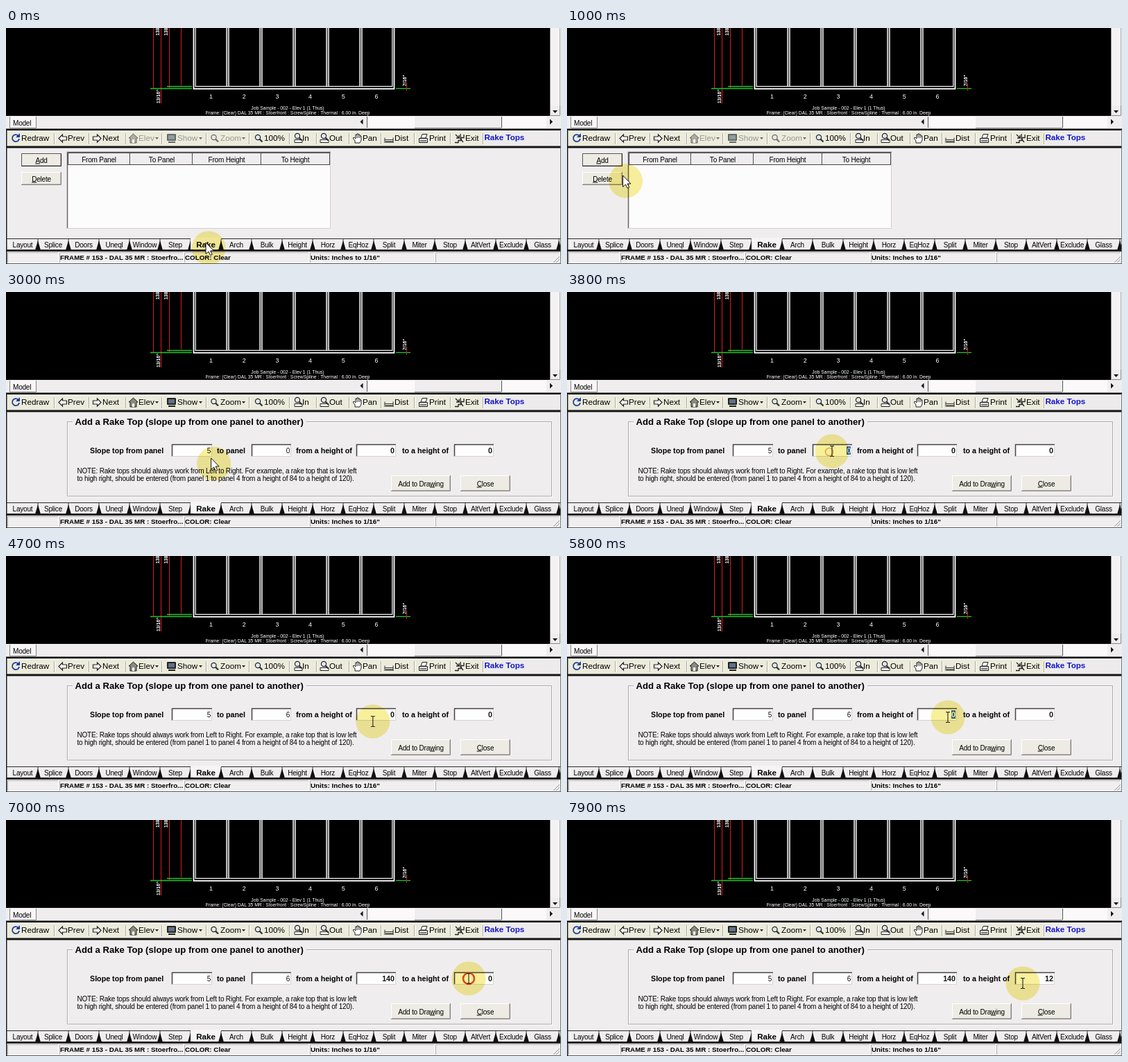
These frames come from a looping animation (800 px wide and 341 px high, 8 s). An HTML page:

```html
<!DOCTYPE html>
<html lang="en">
<head>
<meta charset="utf-8">
<title>Rake Tops</title>
<style>
html, body { margin: 0; width: 100%; height: 100%; overflow: hidden; background: #efedee; }
svg { display: block; width: 100vw; height: 100vh; }
text { font: 10px "Liberation Sans", Arial, sans-serif; letter-spacing: -.2px; white-space: pre; }
.bold { font-weight: bold; font-size: 10.7px; letter-spacing: 0; }
.bar { font-size: 11.7px; letter-spacing: 0; }
.title { font-weight: bold; font-size: 13.1px; letter-spacing: 0; }
.head { font-weight: bold; font-size: 11.6px; letter-spacing: 0; }
.status { font-weight: bold; font-size: 9.8px; letter-spacing: 0; }
.cad { font-size: 6.8px; letter-spacing: 0; fill: #fff; }
.size { font-size: 6.8px; font-weight: bold; letter-spacing: 0; fill: #fff; }
.num { font-size: 9px; letter-spacing: 0; fill: #fff; }
.u { text-decoration: underline; }
.off { opacity: .65; }
.off text { opacity: .55; }
#spot { mix-blend-mode: multiply; }
</style>
</head>
<body>
<svg id="stage" viewBox="0 0 800 341" xmlns="http://www.w3.org/2000/svg"></svg>
<script>
const FACE = '#efedee', BAR = '#ecebdc';

const rect = (x, y, w, h, fill, extra = '') =>
  `<rect x="${x}" y="${y}" width="${w}" height="${h}" fill="${fill}" ${extra}/>`;
const path = (d, stroke = '#111', width = 1, fill = 'none') =>
  `<path d="${d}" stroke="${stroke}" stroke-width="${width}" fill="${fill}"/>`;
const text = (x, y, str, cls = '', anchor = 'start', extra = '') =>
  `<text x="${x}" y="${y}" class="${cls}" text-anchor="${anchor}" ${extra}>${str}</text>`;
const key = c => `<tspan class="u">${c}</tspan>`;
const turned = (x, y, str) => text(0, 0, str, 'size', 'start', `transform="translate(${x} ${y}) rotate(-90)"`);

function button(x, y, w, h, label, strong) {
  const edge = strong ? '#222' : '#858383';
  return rect(x, y, w, h, '#fff') +
    rect(x + 1, y + 1, w - 2, h - 2, '#bdb9b4') +
    rect(x + 1, y + 1, w - 3, h - 3, '#edebe3') +
    path(`M${x} ${y + h - .5}H${x + w - .5}V${y}`, edge) +
    (strong ? path(`M${x + .5} ${y + h}V${y + .5}H${x + w}`, '#555') : '') +
    text(x + w / 2, y + h / 2 + 4, label, '', 'middle');
}

function drawing() {
  let s = rect(0, 0, 784, 127, '#000');
  for (const [x, y] of [[212.5, 87], [223.5, 109], [235.5, 87], [252.5, 83]]) s += path(`M${x} 0V${y}`, '#d01c1c', 1.1);
  s += path('M208 87.5H268M232 84.5H268', '#22c52c', 1.4);
  s += path('M562 87.5H583', '#22c52c', 1.3) + path('M577.5 80V91', '#d01c1c');
  s += path('M270.5 0V87.8H559.5V0', '#fff', 1.8) + path('M273.2 0V84.3H556.8V0', '#eee', 1.3);
  for (let i = 0; i < 5; i++) {
    const x = 318 + 48 * i;
    s += rect(x - .5, 0, 4, 84, '#444') + path(`M${x} 0V84M${x + 3} 0V84`, '#f2f2f2', 1.4);
  }
  for (let i = 0; i < 6; i++) s += text(295.5 + 47.7 * i, 102, i + 1, 'num', 'middle');
  s += turned(221, 11, '138') + turned(233, 11, '138') + turned(221.5, 109, '13/16"') + turned(577, 84, '7/16"');
  s += text(406, 117.5, 'Job Sample - 002 - Elev 1 (1 Thus)', 'cad', 'middle');
  s += text(406, 124.5, 'Frame: (Clear) DAL 35 MR : Stoerfront : ScrewSpline : Thermal : 6.00 in. Deep', 'cad', 'middle');
  return s;
}

function scrollbars() {
  return rect(784, 0, 16, 127, '#f4f2f2') + path('M784.5 0V127M798.5 0V146', '#aaa') +
    rect(785, 112, 14, 15, FACE) + path('M785 126.5H798.5V112', '#888') + path('M788 119H795L791.5 123Z', 'none', 0, '#111') +
    rect(0, 127, 800, 19, FACE) +
    rect(5, 128, 38, 16, '#f7f5f5') + path('M5.5 128V144.5H43.5V128', '#888') + text(10, 141, 'Model') +
    rect(506, 128, 287, 16, '#fbf9f9') + rect(506, 128, 14, 16, FACE) + rect(589, 128, 125, 16, FACE) +
    rect(779, 128, 14, 16, FACE) + path('M520.5 128V144M714.5 128V144', '#555') + path('M589 144.5H714', '#888') +
    path('M514.5 131.5V139.5L510.5 135.5Z M784 131.5V139.5L788 135.5Z', 'none', 0, '#111');
}

const lens = (x, y) => `<circle cx="${x}" cy="${y}" r="3.6" fill="#dfe9f4" stroke="#222" stroke-width="1.2"/>` +
  path(`M${x + 2.6} ${y + 2.6}L${x + 6.5} ${y + 6.5}`, '#333', 2.2);
const drop = x => path(`M${x} 158H${x + 5}L${x + 2.5} 161Z`, 'none', 0, '#222');

function toolbar() {
  let s = rect(0, 145.5, 800, 3, '#111') + rect(0, 148.5, 800, 22, BAR) + rect(688, 148.5, 112, 22, '#edebeb') +
    path('M0 149H800', '#fff') + rect(0, 170.5, 800, 3, '#151515');
  for (const x of [69, 119, 172, 224, 288, 350, 408, 447, 494, 540, 588, 640, 687])
    s += path(`M${x}.5 152V168`, '#aaa89f') + path(`M${x + 1}.5 152V168`, '#fff');
  const labels = { Redraw: 22, Prev: 89, Next: 139, '100%': 372, In: 427, Out: 466, Pan: 514, Dist: 560, Print: 610, Exit: 662 };
  for (const name in labels) s += text(labels[name], 163, name, 'bar');
  s += path('M17.5 155.5A5 5 0 1 0 19 160', '#1c3d9c', 1.8) + path('M20 152V158H14Z', 'none', 0, '#1c3d9c');
  s += path('M76 159.5L81.5 154V157H87.5V162H81.5V165Z M137 159.5L131.5 154V157H125.5V162H131.5V165Z', '#222', 1.2, '#fff');
  s += lens(363, 158) + path('M416 161.5H427V165.5H416Z M453 161.5H465V165.5H453Z', '#222', 1, '#fff') + lens(420, 156) + lens(458, 156);
  s += path('M503 166V163L500 159L502 158L504 160V154H506V153H508V154H510V156H512V162L510 166Z', '#222', 1, '#fff') +
    path('M506 154V159M508 154V159M510 156V159', '#222', .8);
  s += path('M546 158.5V166M558 158.5V166M546 161.5H558', '#333') + path('M547 164.5H558', '#333', 2);
  s += path('M595.5 159.5H607.5V165.5H595.5Z', '#222', 1, '#ddd') + path('M598 159L600 153.5H607L605 159Z', '#222', 1, '#fff') + path('M597 163H606', '#222');
  s += path('M647 165.5H652V162.5H656V158.5H660V154', '#222', 1.3) + path('M648 154L653 159M653 155V159H649M655 153V160L659 165', '#222', 1.3);
  s += '<g id="menus">' +
    path('M177 159L183.5 153L190 159H188V166H179V159Z', '#222', 1, '#8a8a80') + rect(182, 161, 3, 5, '#fff') +
    rect(232, 153, 13, 10, '#222', 'rx="1"') + rect(234, 155, 9, 6, '#5d7288') + rect(234, 164, 10, 2, '#222') +
    lens(299.5, 158) + text(191, 163, 'Elev', 'bar') + text(247, 163, 'Show', 'bar') + text(309, 163, 'Zoom', 'bar') +
    drop(215) + drop(278) + drop(340) + '</g>';
  return s + text(689.5, 162, 'Rake Tops', 'head', 'start', 'fill="#1414c8"');
}

function tabs() {
  const names = 'Layout Splice Doors Uneql Window Step Rake Arch Bulk Height Horz EqHoz Split Miter Stop AltVert Exclude Glass'.split(' ');
  const left = i => 2 + 44 * i;
  let s = path('M0 304.5H800', '#222') + path('M0 303.5H800', '#fff') + path('M0 320.5H800', '#333');
  names.forEach((name, i) => {
    const x = left(i), w = i == 17 ? 47 : 44, on = name == 'Rake';
    if (on) s += rect(x, 303, w, 17, '#f6f4f4');
    s += path(`M${x + w} 305V310`, '#444') +
      path(`M${x + w} 307L${x + w - 4} 321H${x + w + 4}Z`, 'none', 0, '#111') +
      path(`M${x + 1.5} 306L${x + 4.5} 319`, '#fff') +
      text(x + w / 2, on ? 316.5 : 317, name, on ? 'head' : '', 'middle');
  });
  return s;
}

function statusBar() {
  let s = rect(0, 321, 800, 2, '#222') + rect(0, 323, 800, 18, '#f0eeee');
  for (const [x, w] of [[2, 74], [77, 179], [257, 180], [438, 180], [619, 179]])
    s += path(`M${x}.5 339V324.5H${x + w}`, '#b2b0b0') + path(`M${x}.5 339.5H${x + w}V324`, '#fff');
  s += text(78, 335, 'FRAME # 153 - DAL 35 MR : Stoerfro...', 'status') +
    text(258, 335, 'COLOR: Clear', 'status') + text(439, 335, 'Units: Inches to 1/16"', 'status');
  return s + path('M789 339L798 330M793 339L798 334M797 339L798 338', '#999') + path('M0 340.5H800', '#555');
}

function list() {
  let s = button(22, 181, 58, 19, key('A') + 'dd', true) + button(22, 208, 58, 19, key('D') + 'elete') +
    rect(88, 179, 380, 111, '#fdfcfd') + path('M88.5 290V179.5H468', '#666', 1.5) + path('M88 289.5H467.5V180', '#d2d0d0') +
    rect(89.5, 180.5, 377, 17, FACE, 'stroke="#444"');
  for (const x of [178, 268, 367]) s += path(`M${x}.5 181V198`, '#444') + path(`M${x + 1}.5 182V197`, '#fff');
  [['From Panel', 134], ['To Panel', 224.5], ['From Height', 318], ['To Height', 417]].forEach(([name, x]) => s += text(x, 194, name, '', 'middle'));
  return s;
}

const fields = [[239, 297], [354, 411], [505, 562], [646, 703]];

function dialog() {
  const box = 'M96 187.5H88.5V295H786.5V187.5H433';
  let s = `<g transform="translate(1 1)">${path(box, '#fff')}</g>` + path(box, '#aaa8a8') +
    text(99.5, 191.5, 'Add a Rake Top (slope up from one panel to another)', 'title');
  [['Slope top from panel', 121], ['to panel', 304], ['from a height of', 418], ['to a height of', 571]]
    .forEach(([label, x]) => s += text(x, 232.5, label, 'bold'));
  fields.forEach(([l, r], i) => {
    s += rect(l, 220, r - l, 18, '#fefefe') + path(`M${l}.5 238V220.5H${r}`, '#444', 1.5) + path(`M${l} 237.5H${r - .5}V221`, '#d4d2d2') +
      rect(r - 8, 223, 6, 12, '#2f62b8', `id="sel${i}"`) + text(r - 2, 232.5, '0', i > 1 ? 'bold' : '', 'end', `id="val${i}"`);
  });
  return s + text(102.5, 261.5, 'NOTE: Rake tops should always work from Left to Right. For example, a rake top that is low left') +
    text(102.5, 272.5, 'to high right, should be entered (from panel 1 to panel 4 from a height of 84 to a height of 120).') +
    button(555, 265, 86, 23, 'Add to Dra' + key('w') + 'ing') + button(655, 265, 72, 23, key('C') + 'lose');
}

const pointer = '<circle id="spot" r="24.5" fill="#f9f09c"/><circle id="ring" fill="none"/>' +
  '<path id="arrow" d="M-4-8V8.5L0 5L2.7 10.5L5.2 9.3L2.6 4H7.5Z" fill="#fff" stroke="#111"/>' +
  '<path id="beam" d="M-3-7.5H-1L0-6.5L1-7.5H3M0-6.5V6.5M-3 7.5H-1L0 6.5L1 7.5H3" fill="none" stroke="#222" stroke-width="1.1"/>';

const stage = document.getElementById('stage');
stage.innerHTML = rect(0, 0, 800, 341, FACE) + drawing() + scrollbars() + toolbar() +
  `<g id="list">${list()}</g><g id="dialog">${dialog()}</g>` + tabs() + statusBar() +
  path('M.5 147V341', '#222', 2) + path('M799.5 147V341', '#777') + pointer;

const $ = id => document.getElementById(id);

// time, x, y of the pointer
const track = [
  [0, 292, 318], [400, 292, 318], [1000, 84.5, 221], [1200, 48, 198], [1700, 48, 198], [2000, 122, 218],
  [2400, 294, 249], [2900, 294, 249], [3400, 364, 236], [3700, 378, 231], [3800, 382, 230], [3900, 382, 230], [4200, 370, 246],
  [4600, 510, 244], [4800, 534, 235], [5300, 534, 235], [5600, 544, 244], [5800, 549, 233], [6200, 549, 233],
  [6500, 584, 258], [6900, 667, 229], [7400, 667, 229], [7700, 655, 244], [7900, 657, 236], [8000, 657, 236]
];
// time, field, value, selected
const edits = [
  [1500, 0, '0', 1], [2700, 0, '5', 0], [3700, 1, '0', 1], [4000, 1, '6', 0], [5100, 2, '0', 1], [5900, 2, '1', 0],
  [6000, 2, '14', 0], [6100, 2, '140', 0], [7200, 3, '0', 1], [7800, 3, '1', 0], [7900, 3, '12', 0]
];
const clicks = [1400, 3700, 4900, 7000];
const LOOP = 8000, OPEN = 1500, TICK = 100;

function slope(i, k) {
  const a = track[i - 1], b = track[i], c = track[i + 1];
  if (!a || !c || a[k] == b[k] || b[k] == c[k]) return 0;
  return (c[k] - a[k]) / (c[0] - a[0]);
}

// smooth curve through the track points
function along(t, k) {
  let i = 0;
  while (i < track.length - 2 && track[i + 1][0] <= t) i++;
  const a = track[i], b = track[i + 1], d = b[0] - a[0], u = (t - a[0]) / d, v = 1 - u;
  return a[k] * v * v * (1 + 2 * u) + b[k] * u * u * (3 - 2 * u) + d * u * v * (slope(i, k) * v - slope(i + 1, k) * u);
}

const show = (id, on) => $(id).setAttribute('visibility', on ? 'visible' : 'hidden');
const place = (id, x, y) => $(id).setAttribute('transform', `translate(${x} ${y})`);

function render(t) {
  const x = along(t, 1), y = along(t, 2), open = t >= OPEN;
  $('list').style.display = open ? 'none' : '';
  $('dialog').style.display = open ? '' : 'none';
  $('menus').setAttribute('class', open ? '' : 'off');

  fields.forEach((f, i) => {
    const [, , value, sel] = edits.filter(e => e[1] == i && e[0] <= t).pop() || [0, i, '0', 0];
    $('val' + i).textContent = value;
    $('val' + i).setAttribute('fill', sel ? '#fff' : '#111');
    $('sel' + i).style.display = sel ? '' : 'none';
  });

  const beam = open && y > 219 && y < 240 && fields.some(([l, r]) => x >= l && x <= r);
  show('beam', beam);
  show('arrow', !beam);
  for (const id of ['spot', 'arrow', 'beam']) place(id, x, y);

  const click = clicks.find(c => t >= c && t < c + 2 * TICK);
  show('ring', click !== undefined);
  if (click === undefined) return;
  const fresh = t - click < TICK, ring = $('ring');
  place('ring', along(click, 1), along(click, 2));
  ring.setAttribute('r', fresh ? 8 : 5.5);
  ring.setAttribute('stroke', fresh ? '#d9481c' : '#e0a848');
  ring.setAttribute('stroke-width', fresh ? 2.6 : 1.6);
}

const start = performance.now();
function tick() {
  const t = (performance.now() - start) % LOOP;
  render(Math.floor(t / TICK) * TICK);
  requestAnimationFrame(tick);
}
tick();
</script>
</body>
</html>
```
